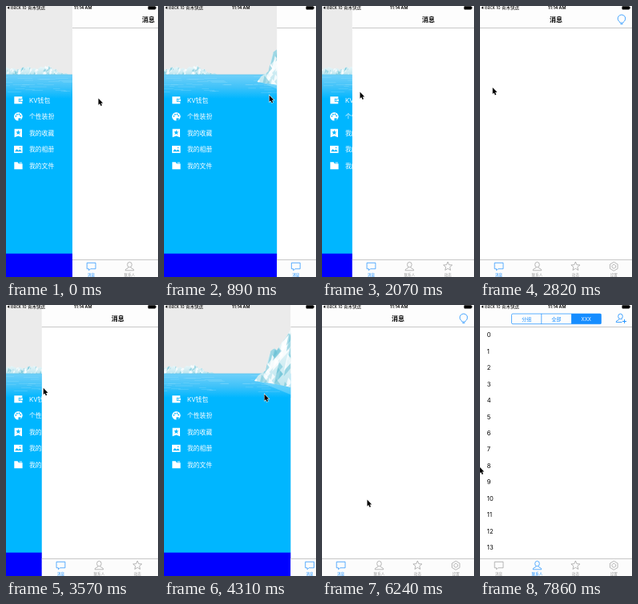
These frames come from a looping animation (190x339 px, 8000 ms). An HTML page with a canvas:

```html
<!DOCTYPE html>
<html lang="zh-CN">
<head>
<meta charset="utf-8">
<title>Side menu</title>
<style>
html, body { margin: 0; width: 100%; height: 100%; overflow: hidden; background: #fff; }
canvas { display: block; width: 190px; height: 339px; }
</style>
</head>
<body>
<canvas id="stage"></canvas>
<script>
const W = 190, H = 339, LOOP = 8000, STEP = 148.4, OPEN = 158.5;
const BLUE = '#168dff', GRAY = '#999', LINE = '#c8c8c8', SEA = '#00b6ff';
const FONT = 'Inter, "Noto Sans CJK SC", "Noto Sans CJK", sans-serif';
const canvas = document.getElementById('stage');
const ctx = canvas.getContext('2d');
const scale = window.devicePixelRatio || 1;
canvas.width = W * scale;
canvas.height = H * scale;

// ---- Motion ----
const mix = (a, b, u) => a + (b - a) * u;
const span = (t, a, b) => Math.min(1, Math.max(0, (t - a) / (b - a)));
const easeOut = u => 1 - (1 - u) ** 1.35;
const smooth = u => u * u * (3 - 2 * u);

// Pointer trips: start and end time, destination
const trips = [
  [0, 440, 148, 112], [740, 1930, 47, 107], [2520, 3030, 1.5, 99], [3270, 4300, 125, 111],
  [4600, 5490, 171, 80], [5790, 6230, 56, 243], [6240, 6980, 71, 326], [7420, 7860, -1, 202]
];

function pointerAt(t) {
  return trips.reduce(([x, y], [a, b, toX, toY]) => {
    const u = easeOut(span(t, a, b));
    return [mix(x, toX, u), mix(y, toY, u)];
  }, [115, 115]);
}

function edgeAt(t, pointerX) {
  if (t < 740) return mix(83, OPEN, easeOut(span(t, 0, 440)));
  if (t < 1930) return Math.min(OPEN, pointerX + 10);
  if (t < 3270) return mix(57, 0, span(t, 1930, 2370));
  return OPEN * (span(t, 3270, 4300) - smooth(span(t, 5430, 5935)));
}

// ---- Drawing helpers ----
function text(s, x, y, size, color, align = 'left', weight = 400) {
  ctx.font = `${weight} ${size}px ${FONT}`;
  ctx.textAlign = align;
  ctx.fillStyle = color;
  ctx.fillText(s, x, y);
}

function rect(x, y, w, h, color) {
  ctx.fillStyle = color;
  ctx.fillRect(x, y, w, h);
}

function poly(points, fill) {
  ctx.beginPath();
  points.forEach(([x, y]) => ctx.lineTo(x, y));
  ctx.closePath();
  if (fill) { ctx.fillStyle = fill; ctx.fill(); }
}

function dot(x, y, r, color) {
  ctx.beginPath();
  ctx.arc(x, y, r, 0, 7);
  ctx.fillStyle = color;
  ctx.fill();
}

function place(x, y, draw) {
  ctx.save();
  ctx.translate(x, y);
  draw();
  ctx.restore();
}

function vertical(y0, y1, ...colors) {
  const g = ctx.createLinearGradient(0, y0, 0, y1);
  colors.forEach((c, i) => g.addColorStop(i / (colors.length - 1), c));
  return g;
}

// Points around the origin, with radii taken in turn
const ring = (n, ...radii) => Array.from({ length: n }, (_, i) => {
  const a = i * 2 * Math.PI / n - Math.PI / 2, r = radii[i % radii.length];
  return [Math.cos(a) * r, Math.sin(a) * r];
});

function seeded(seed) {
  return () => (seed = seed * 16807 % 2147483647) / 2147483647;
}

// ---- Menu panel ----
const menu = [
  ['KV钱包', () => {
    rect(-5, -4.5, 10, 9, '#fff');
    rect(0.5, -2, 5, 4, SEA);
    rect(1.3, -1.3, 4.2, 2.6, '#fff');
    dot(2.8, 0, 0.7, SEA);
  }],
  ['个性装扮', () => {
    dot(0, 0, 5.3, '#fff');
    for (let a = 3.3; a < 6.3; a += 0.9) dot(3 * Math.cos(a), 3 * Math.sin(a), 0.9, SEA);
    poly([[0.3, 2], [3.5, 2.3], [2.6, 5.5], [0, 5.5]], SEA);
  }],
  ['我的收藏', () => {
    poly([[-4.7, -5], [4.7, -5], [4.7, 5.5], [0, 3.7], [-4.7, 5.5]], '#fff');
    place(0, -0.5, () => poly(ring(10, 3.2, 1.4), SEA));
  }],
  ['我的相册', () => {
    rect(-5.3, -4.5, 10.6, 9, '#fff');
    poly([[-4.2, 2.6], [-1.8, -0.4], [0.4, 1.6], [2.2, 0], [4.3, 2.6]], SEA);
    dot(2.3, -2.1, 0.8, SEA);
  }],
  ['我的文件', () => {
    poly([[-5, -4.5], [-0.8, -4.5], [0.6, -2.6], [5.3, -2.6], [5.3, 4.5], [-5, 4.5]], '#fff');
    rect(1.3, -4.2, 3.4, 0.9, '#fff');
  }]
];

// An ice shape filled with random slanted facets
function ice(outline, [x, y, w, h], size, count) {
  const rnd = seeded(count * 97);
  ctx.save();
  poly(outline, vertical(y, y + h, '#f2fafb', '#bfe6ef'));
  ctx.clip();
  for (let i = 0; i < count; i++) {
    const px = x + rnd() * w, py = y + rnd() * h, s = size * (0.4 + rnd());
    poly([[px, py], [px + s * 0.4, py + s * 0.5], [px - s * 0.3, py + s * 1.3]],
      i % 2 ? 'rgba(255,255,255,.8)' : 'rgba(96,190,212,.5)');
  }
  ctx.restore();
}

function scenery() {
  const hump = (x, mid, height) => height * Math.exp(-(((x - mid) / 13) ** 2));
  const rnd = seeded(11);
  const ridge = [[-40, 86]];
  for (let x = -40; x < 62; x += 2) {
    ridge.push([x, 83 - hump(x, -16, 7) - hump(x, 10, 7) - hump(x, 36, 9) + rnd() * 2.5]);
  }
  ridge.push([63, 86]);
  ice(ridge, [-40, 73, 103, 13], 4, 90);

  rect(-40, 86, 240, 30, vertical(86, 116, '#6fd0fa', '#42c3f9', SEA));
  rect(-40, 85.6, 240, 0.8, '#5cc4ea');
  for (let i = 0; i < 40; i++) {
    rect(rnd() * 170 - 40, 88 + rnd() * 20, 6 + rnd() * 16, 0.6, 'rgba(170,230,252,.35)');
  }

  poly([[114, 94], [158, 100], [200, 100], [200, 113], [158, 112]], 'rgba(160,228,250,.4)');
  ice([[113, 95], [118, 88], [127, 82], [130, 68], [133, 58], [138, 54], [141, 57], [147, 47],
    [153, 40], [159, 29], [200, 29], [200, 103], [159, 103], [140, 99]], [113, 30, 47, 72], 13, 60);
}

function panel(edge) {
  ctx.save();
  ctx.beginPath();
  ctx.rect(0, 0, edge, H);
  ctx.clip();
  rect(0, 0, W, 87, '#ebebeb');
  rect(0, 86, W, 224, SEA);
  place((OPEN - edge) * 0.2, 0, scenery);
  rect(0, 309.7, W, 30, '#00f');
  menu.forEach(([label, icon], i) => {
    const y = 117.8 + i * 20.5;
    place(15.3, y, icon);
    text(label, 29, y + 2.9, 7.8, '#fff');
  });
  ctx.restore();
}

// ---- Main page ----
function person() {
  ctx.beginPath();
  ctx.ellipse(0, -2.2, 2.8, 3.3, 0, 0, 7);
  ctx.stroke();
  ctx.beginPath();
  ctx.moveTo(-1.4, 1);
  ctx.quadraticCurveTo(-1.5, 2.2, -3.5, 2.7);
  ctx.quadraticCurveTo(-5.3, 3.2, -5.3, 5);
  ctx.lineTo(5.3, 5);
  ctx.quadraticCurveTo(5.3, 3.2, 3.5, 2.7);
  ctx.quadraticCurveTo(1.5, 2.2, 1.4, 1);
  ctx.stroke();
}

const tabs = [
  ['消息', () => {
    poly([[-5.4, -4.5], [5.4, -4.5], [5.4, 3], [-1, 3], [-3, 5], [-3, 3], [-5.4, 3]]);
    ctx.stroke();
  }],
  ['联系人', person],
  ['动态', () => { poly(ring(10, 5.8, 2.6)); ctx.stroke(); }],
  ['设置', () => {
    poly(ring(6, 5.5));
    ctx.stroke();
    poly(ring(12, 2.4));
    ctx.stroke();
  }]
];

function tabBar(active) {
  rect(0, 317, W, 22, '#fcfcfc');
  rect(0, 317, W, 1, LINE);
  tabs.forEach(([label, icon], i) => {
    const x = 23.6 + i * 47.9, color = i === active ? BLUE : GRAY;
    ctx.strokeStyle = color;
    ctx.lineWidth = 0.7;
    place(x, 325.8, icon);
    text(label, x, 337.9, 4.6, color, 'center');
  });
}

function messages() {
  text('消息', 95, 19.9, 8, '#000', 'center', 600);
  ctx.strokeStyle = BLUE;
  ctx.lineWidth = 0.8;
  place(177, 16, () => {
    ctx.beginPath();
    ctx.arc(0, -0.3, 4.7, 2.2, 7.22);
    ctx.lineTo(1.8, 5);
    ctx.lineTo(-1.8, 5);
    ctx.closePath();
    ctx.stroke();
    rect(-1.5, 6, 3, 0.8, BLUE);
  });
}

function contacts() {
  const cell = 37.3, left = 39.5;
  rect(left + 2 * cell, 11, cell, 12.7, BLUE);
  ctx.strokeStyle = BLUE;
  ctx.lineWidth = 0.7;
  ctx.beginPath();
  ctx.roundRect(left, 11, 3 * cell, 12.7, 1.5);
  ctx.moveTo(left + cell, 11);
  ctx.lineTo(left + cell, 23.7);
  ctx.stroke();
  ['分组', '全部', 'XXX'].forEach((label, i) =>
    text(label, left + cell * (i + 0.5), 19.5, 6, i === 2 ? '#fff' : BLUE, 'center'));
  ctx.lineWidth = 0.8;
  place(175.5, 16.5, person);
  rect(177.5, 18, 6, 5, '#fdfdfd');
  rect(178, 20, 5, 0.9, BLUE);
  rect(180.05, 17.9, 0.9, 5, BLUE);
  for (let i = 0; i < 14; i++) text(i, 8.8, 40.2 + i * 20.46, 7.6, '#000');
}

function page(edge, onContacts) {
  place(edge, 0, () => {
    rect(0, 0, W, H, '#fff');
    rect(0, 0, W, 27, '#fdfdfd');
    rect(0, 27, W, 1, LINE);
    onContacts ? contacts() : messages();
    tabBar(onContacts ? 1 : 0);
  });
}

function statusBar() {
  poly([[1.5, 2.2], [4.2, 0.3], [4.2, 4.1]], '#000');
  text('Back to 青禾快送', 6, 4.3, 5.5, '#000');
  text('11:14 AM', 96.3, 4.3, 5.4, '#000', 'center', 600);
  ctx.beginPath();
  ctx.roundRect(177.5, 0.2, 9.5, 4.2, 0.8);
  ctx.fill();
  rect(187.3, 1.4, 0.8, 1.8, '#000');
}

function pointer(x, y) {
  place(x + 0.5, y + 0.5, () => {
    ctx.scale(0.85, 0.85);
    poly([[0, 0], [0, 9.6], [2.1, 7.7], [3.6, 11.2], [5.3, 10.4], [3.8, 7.1], [6.7, 7]]);
    ctx.strokeStyle = '#fff';
    ctx.lineWidth = 1.2;
    ctx.stroke();
    ctx.fillStyle = '#000';
    ctx.fill();
  });
}

function draw(now) {
  // The picture advances in even steps
  const t = Math.floor((now % LOOP + 10) / STEP) * STEP;
  const [x, y] = pointerAt(t), edge = edgeAt(t, x);
  ctx.setTransform(scale, 0, 0, scale, 0, 0);
  if (edge > 0) panel(edge);
  page(edge, t > 7100);
  statusBar();
  pointer(x, y);
}

const start = performance.now();
function loop() {
  draw(performance.now() - start);
  requestAnimationFrame(loop);
}
loop();
</script>
</body>
</html>
```
